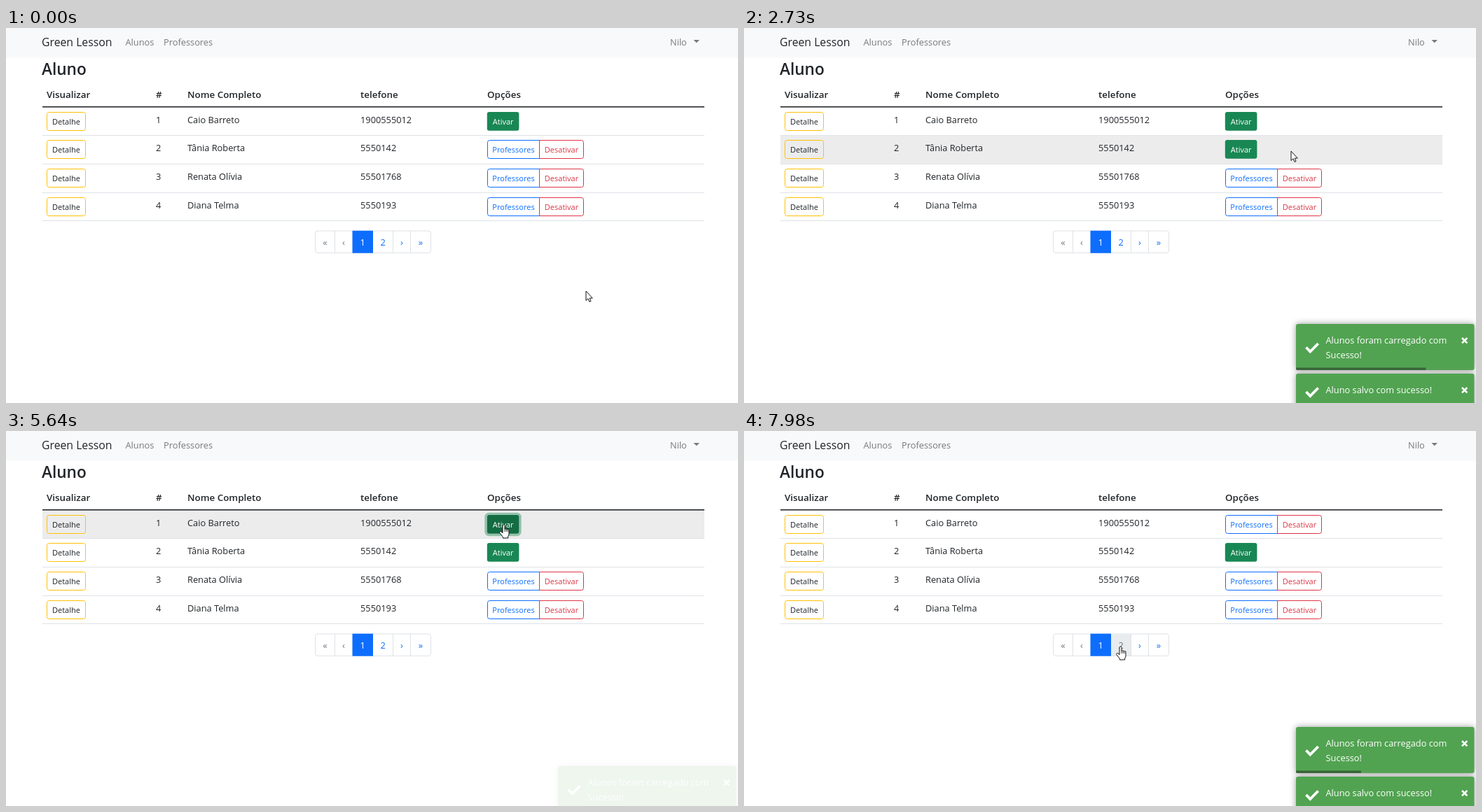
These frames come from a looping animation (1045 px wide and 536 px high, 8 s). An HTML page:

```html
<!DOCTYPE html>
<html lang="pt">
<head>
<meta charset="utf-8">
<style>
html, body { margin: 0; width: 100%; height: 100%; overflow: hidden; background: #fff; }
svg { display: block; font: 12.8px "Open Sans", "Noto Sans", sans-serif; fill: #212529; }
.mid { text-anchor: middle; }
.bold { font-weight: 600; font-size: 13.4px; }
.small { font-size: 11px; }
.shadow { filter: drop-shadow(0 0 5px #999); }
</style>
</head>
<body>
<svg id="stage" width="1045" height="536" viewBox="0 0 1045 536"></svg>
<script>
const LOOP = 8000, ROW = 40.7, TOP = 113;
const BLUE = '#0d6efd', RED = '#dc3545', GREEN = '#198754', LINE = '#dee2e6';
const DEACTIVATED = 1700, ACTIVATED = 5800;
const people = [
  ['Caio Barreto', '1900555012'],
  ['Tânia Roberta', '5550142'],
  ['Renata Olívia', '55501768'],
  ['Diana Telma', '5550193'],
];
// Pointer path: time, x, y
const path = [
  [0, 828, 376], [610, 828, 376], [960, 830, 295], [1030, 810, 280], [1100, 797, 225],
  [1170, 786, 181], [1310, 784, 178], [1440, 781, 176], [3290, 781, 176], [4050, 750, 163],
  [4350, 722, 142], [4530, 716, 138], [5200, 716, 138], [5400, 711, 134], [6350, 711, 134],
  [6750, 665, 140], [7080, 634, 155], [7360, 600, 196], [7750, 550, 285], [7980, 538, 308], [8000, 538, 308],
];
const stage = document.getElementById('stage');
let now = 0, hand = false;

const clamp = v => Math.max(0, Math.min(1, v));
const mix = (a, b, p) => `color-mix(in srgb, ${b} ${(p * 100).toFixed(1)}%, ${a})`;

function pointer(t) {
  t = Math.max(0, t);
  const i = Math.max(1, path.findIndex(k => k[0] >= t));
  const [t0, x0, y0] = path[i - 1], [t1, x1, y1] = path[i];
  const p = (t - t0) / (t1 - t0);
  return [x0 + (x1 - x0) * p, y0 + (y1 - y0) * p];
}

// Eased share of the last 150 ms spent over the box, which gives the hover fade
function hover(x, y, w, h) {
  const inside = t => {
    const [px, py] = pointer(t);
    return px >= x && px < x + w && py >= y && py < y + h;
  };
  if (inside(now)) hand = true;
  let sum = 0;
  for (let k = 1; k <= 6; k++) sum += inside(now - k * 25);
  const p = sum / 6;
  return p * p * (3 - 2 * p);
}

const text = (x, y, s, attrs = '') => `<text x="${x}" y="${y}" ${attrs}>${s}</text>`;
const rect = (x, y, w, h, fill, attrs = '') =>
  `<rect x="${x}" y="${y}" width="${w}" height="${h}" fill="${fill}" ${attrs}/>`;

// Box with separate corner radii on its left and right side
function box(x, y, w, h, l, r, attrs) {
  return `<path d="M${x + l} ${y}h${w - l - r}a${r} ${r} 0 0 1 ${r} ${r}v${h - 2 * r}a${r} ${r} 0 0 1 ${-r} ${r}` +
    `h${l + r - w}a${l} ${l} 0 0 1 ${-l} ${-l}v${2 * l - h}a${l} ${l} 0 0 1 ${l} ${-l}z" ${attrs}/>`;
}

const ring = (x, y, w, color) =>
  rect(x - 2, y - 2, w + 4, 30, 'none', `rx="4.5" stroke="${color}" stroke-opacity=".5" stroke-width="3.4"`);

function outlineButton(x, y, w, label, color, l, r) {
  const p = hover(x, y, w, 26);
  return box(x, y, w, 26, l, r, `fill="${color}" fill-opacity="${p}" stroke="${color}"`) +
    text(x + w / 2, y + 17.5, label, `class="mid small" fill="${mix(color, 'white', p)}"`);
}

function activateButton(y, pressed) {
  const p = hover(687, y, 45, 26);
  const fill = pressed ? '#146c43' : mix(GREEN, '#157347', p);
  return (pressed ? ring(687, y, 45, '#3c996e') : '') +
    rect(686.8, y - .4, 45.6, 26.6, fill, 'rx="3"') +
    text(709.7, y + 17.5, 'Ativar', 'class="mid small" fill="#fff"');
}

function row([name, phone], i) {
  const top = TOP + i * ROW, y = Math.round(top + 6.6) + .5, base = top + 22.5;
  const py = pointer(now)[1];
  const active = i > 1 || (i ? now < DEACTIVATED : now >= ACTIVATED);
  let out = '';
  if (py >= top + .5 && py < top + ROW + .5) out += rect(52, top, 945, ROW, '#ececec');
  out += rect(52, Math.round(top + ROW - .6), 945, 1, LINE);
  out += rect(58.5, y, 55, 26, 'none', 'rx="3" stroke="#ffc107"') +
    text(86, y + 17.5, 'Detalhe', 'class="mid small"');
  out += text(214, base, i + 1) + text(259, base, name) + text(506, base, phone);
  if (!active) return out + activateButton(y, i === 0 && now >= 5600);
  out += outlineButton(687.5, y, 74, 'Professores', BLUE, 3, 0);
  if (i === 1 && now >= 1600) out += ring(761.5, y, 63, RED);
  return out + outlineButton(761.5, y, 63, 'Desativar', RED, 0, 3);
}

function pagination() {
  const edges = [441.5, 469.5, 494.5, 524, 552.5, 577.5, 606.5];
  let out = rect(441.5, 290, 165, 31.5, '#fff', `rx="3.5" stroke="${LINE}"`);
  ['«', '‹', '1', '2', '›', '»'].forEach((label, i) => {
    const x = edges[i], w = edges[i + 1] - x;
    let color = i < 2 ? '#6c757d' : BLUE;
    if (i === 2) {
      out += rect(x, 289.7, w, 32, BLUE);
      color = '#fff';
    } else if (i === 3) {
      const p = hover(x, 290, w, 31);
      out += rect(x, 290.5, w, 30.5, '#e9ecef', `opacity="${p}"`);
      color = mix(BLUE, '#6c757d', p);
    }
    if (i === 1 || i > 3) out += rect(x - .5, 290, 1, 31, LINE);
    out += text(x + w / 2, 311, label, `class="mid" fill="${color}"`);
  });
  return out;
}

function toast(top, lines, opacity, bar = 0) {
  if (opacity <= 0) return '';
  const h = lines.length > 1 ? 66 : 51, c = top + h / 2;
  return `<g opacity="${opacity}">` +
    rect(788, top, 254.5, h, '#51a351', 'rx="3" class="shadow"') +
    `<path d="M802.5 ${c + .5}l5.8 6l11.4-11.5" fill="none" stroke="#fff" stroke-width="3.8"/>` +
    `<path d="M1025 ${top + 20}l7.4 7.4m0-7.4l-7.4 7.4" stroke="#fff" stroke-width="2.6"/>` +
    lines.map((s, i) => text(830.5, top + 28 + i * 20.5, s, 'fill="#fff"')).join('') +
    rect(788, top + 62.5, 254 * bar, 3.5, '#000', 'opacity=".4"') + '</g>';
}

// Saved message first, then the loaded message stacked above it
function toasts(start, barStart, life, end) {
  const fade = (a, b) => now < a ? 0 : clamp((now - a) / 300) ** 1.7 * (1 - clamp((now - b) / 300) ** 1.7);
  const bar = clamp(1 - (now - barStart) / life);
  const savedGone = now >= end + 300;
  return toast(savedGone ? 479 : 423, ['Alunos foram carregado com', 'Sucesso!'], fade(start + 60, end + 58), bar) +
    toast(494, ['Aluno salvo com sucesso!'], fade(start, end));
}

function cursor() {
  const [x, y] = pointer(now).map(Math.round);
  const shape = hand
    ? '<path d="M-2 1.5a1.5 1.5 0 0 1 3 0V6.3a1.1 1.1 0 0 1 2.1.4a1.1 1.1 0 0 1 2 .6a1 1 0 0 1 1.9.8v5q0 2-1.3 3.6V19h-7.4v-1.7L-6.3 11.4a1.4 1.4 0 0 1 2.2-1.6L-2 11.7z"/>' +
      '<path d="M1 6v4M3.1 7v3M5.1 7.5V10" fill="none" stroke-width=".8"/>'
    : '<path d="M0 0V13.5L3 10.8L5 15.4L7 14.5L5.2 10.1H9.3z"/>';
  return `<g transform="translate(${x} ${y})" fill="#fff" stroke="#111" stroke-linejoin="round">${shape}</g>`;
}

function header() {
  const gray = 'fill="#77797b"';
  return rect(0, 0, 1045, 42.5, '#f8f9fa') +
    text(51, 26, 'Green Lesson', 'font-size="15.8"') +
    text(170.5, 25, 'Alunos', gray) + text(225, 25, 'Professores', gray) +
    text(948, 25, 'Nilo', gray) + `<path d="M981.5 17h8.5l-4.25 4.2z" ${gray}/>` +
    text(51, 67, 'Aluno', 'font-size="22.6" font-weight="600"') +
    [[58, 'Visualizar'], [214, '#'], [259, 'Nome Completo'], [506, 'telefone'], [687, 'Opções']]
      .map(([x, s]) => text(x, 100, s, 'class="bold"')).join('');
}

function draw() {
  now = performance.now() % LOOP;
  hand = false;
  stage.innerHTML = header() + people.map(row).join('') + rect(52, 111.9, 945, 1.6, '#212529') +
    pagination() + toasts(1640, 1674, 3913, 5300) + toasts(5720, 5733, 3543, 9000) + cursor();
  requestAnimationFrame(draw);
}
draw();
</script>
</body>
</html>
```
